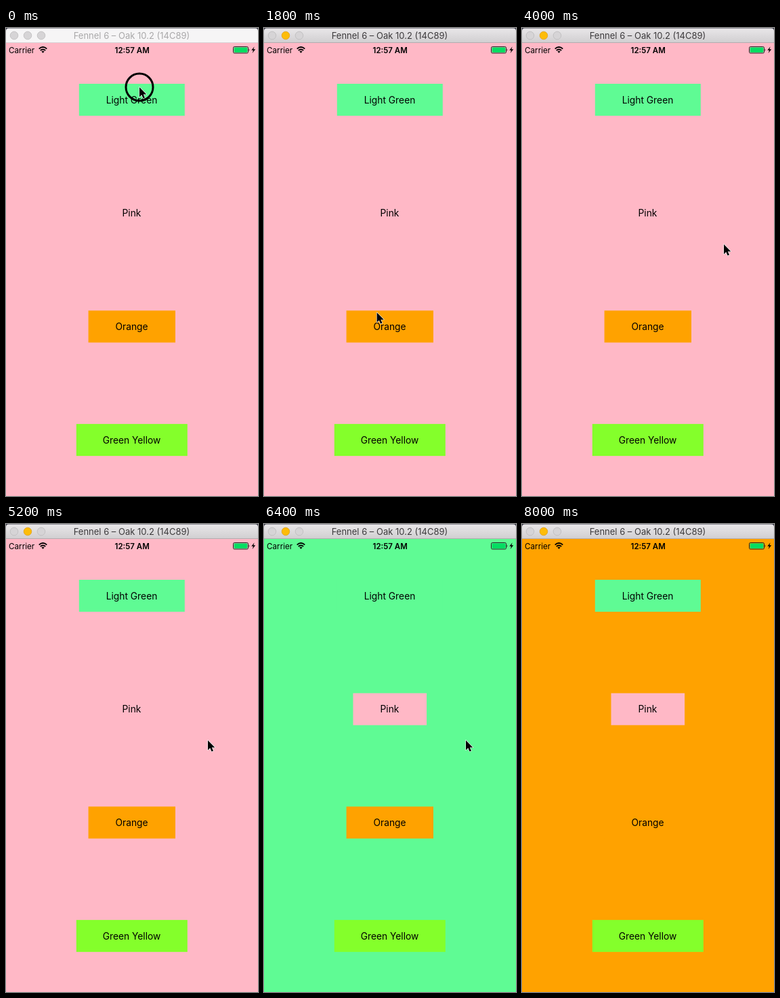
These frames come from a looping animation (372x688 px, 8100 ms). An HTML page:

```html
<!DOCTYPE html>
<html lang="en">
<head>
<meta charset="utf-8">
<title>Delayed colour buttons</title>
<style>
  html, body { margin: 0; width: 100%; height: 100%; overflow: hidden; }
  svg { display: block; width: 372px; height: 688px; }
  text { font-family: Inter, Roboto, sans-serif; }
</style>
</head>
<body>
<svg viewBox="0 0 372 688">
  <defs>
    <linearGradient id="bar" x2="0" y2="1">
      <stop offset="0" stop-color="#e9e7e9"/>
      <stop offset="1" stop-color="#d1cfd1"/>
    </linearGradient>
  </defs>
  <rect id="screen" width="372" height="688"/>

  <rect width="372" height="8" fill="#3b3b48"/>
  <path id="title" d="M0 21V4.5Q0 .5 4 .5H368Q372 .5 372 4.5V21Z"/>
  <path id="edge" d="M0 21.5H372"/>
  <g id="lights"></g>
  <text id="caption" x="185.5" y="16" font-size="13" text-anchor="middle">Fennel 6 – Oak 10.2 (14C89)</text>

  <text x="4" y="36.6" font-size="11.7">Carrier</text>
  <g fill="none" stroke="#000" stroke-width="1.9">
    <path d="M48.7 30.6Q54.5 25.6 60.3 30.6"/>
    <path d="M50.8 33Q54.5 29.8 58.2 33"/>
  </g>
  <path d="M52.4 34.6Q54.5 33 56.6 34.6L54.5 36.8Z"/>
  <text x="186.2" y="36.6" font-size="11.5" font-weight="600" text-anchor="middle">12:57 AM</text>
  <rect x="335.5" y="27.5" width="22" height="9.5" rx="1.8" fill="none" stroke="#222"/>
  <rect x="336.6" y="28.6" width="19.8" height="7.3" rx=".8" fill="#04dd62"/>
  <path d="M358.7 30.3Q360.3 32.2 358.7 34.2Z"/>
  <path d="M366.6 27.3L362.3 32.7H365L363.6 37L368.2 31.3H365.3Z"/>

  <g id="buttons"></g>
  <circle id="ring" r="20" fill="none" stroke="#000" stroke-width="3"/>
  <path id="cursor" d="M0 0V14.4L3.3 11.3L5.5 16.5L8 15.4L5.8 10.4H10.3Z"
        stroke="#fff" stroke-width="1.2" stroke-linejoin="round" paint-order="stroke"/>
</svg>
<script>
const LOOP = 8100, STEP = 100;
const COLORS = { green: '#5ffb94', pink: '#ffb8c6', orange: '#ffa200', lime: '#84ff2b' };
const $ = id => document.getElementById(id);

function add(parent, tag, attrs, text = '') {
  const el = document.createElementNS('http://www.w3.org/2000/svg', tag);
  set(el, attrs);
  el.textContent = text;
  return parent.appendChild(el);
}

function set(el, attrs) {
  for (const k in attrs) el.setAttribute(k, attrs[k]);
}

const lights = [12, 32, 52].map(cx => add($('lights'), 'circle', {
  cx, cy: 11, r: 5.8, fill: '#d6d4d6', stroke: '#bdbbbd', 'stroke-width': .8
}));

const buttons = [
  ['Light Green', COLORS.green, 156],
  ['Pink', COLORS.pink, 108.6],
  ['Orange', COLORS.orange, 128.4],
  ['Green Yellow', COLORS.lime, 164]
].map(([label, fill, width], i) => {
  const g = add($('buttons'), 'g', {}), y = 82 + i * 166.7;
  add(g, 'rect', { x: 185.8 - width / 2, y, width, height: 47, fill });
  add(g, 'text', { x: 185.5, y: y + 28.6, 'font-size': 13.8, 'text-anchor': 'middle' }, label);
  return g;
});

// Cursor stops: time, x, y
const PATH = [
  [200, 197, 87], [900, 153, 327], [1900, 167, 421],
  [2500, 167, 421], [3100, 298, 318], [7000, 298, 318], [7300, 380, 300]
];

function cursorAt(t) {
  const i = PATH.findIndex(p => p[0] > t);
  if (i === 0) return PATH[0].slice(1);
  if (i < 0) return PATH[PATH.length - 1].slice(1);
  const a = PATH[i - 1], b = PATH[i];
  const u = (t - a[0]) / (b[0] - a[0]), e = u * u * (3 - 2 * u);
  return [1, 2].map(k => a[k] + (b[k] - a[k]) * e);
}

// A press dims the button at once, then it fades back
function pressOpacity(dt) {
  return dt < 100 || dt > 400 ? 1 : Math.min(1, .2 + (dt - 100) / 400);
}

function draw(t) {
  const active = t >= 100;
  const bg = t < 5300 ? COLORS.pink : t < 7600 ? COLORS.green : COLORS.orange;
  set($('screen'), { fill: bg });
  set($('title'), { fill: active ? 'url(#bar)' : '#f6f5f6' });
  set($('edge'), { stroke: active ? '#b3adb0' : '#d9d3d6' });
  set($('caption'), { fill: active ? '#3c3a3c' : '#a9a8a9' });
  set(lights[1], active ? { fill: '#fdbc09', stroke: '#dfa01f' } : { fill: '#d6d4d6', stroke: '#bdbbbd' });

  set(buttons[0], { opacity: pressOpacity(t) });
  set(buttons[2], { opacity: pressOpacity(t - 2300) });

  const [x, y] = cursorAt(t);
  const at = { transform: `translate(${x} ${y})` };
  const down = t < 100 || (t >= 2300 && t < 2400);
  set($('ring'), { ...at, opacity: +down });
  set($('cursor'), at);
}

const start = performance.now();
function tick() {
  const t = (performance.now() - start) % LOOP;
  draw(Math.floor(t / STEP) * STEP);
  requestAnimationFrame(tick);
}
tick();
</script>
</body>
</html>
```
